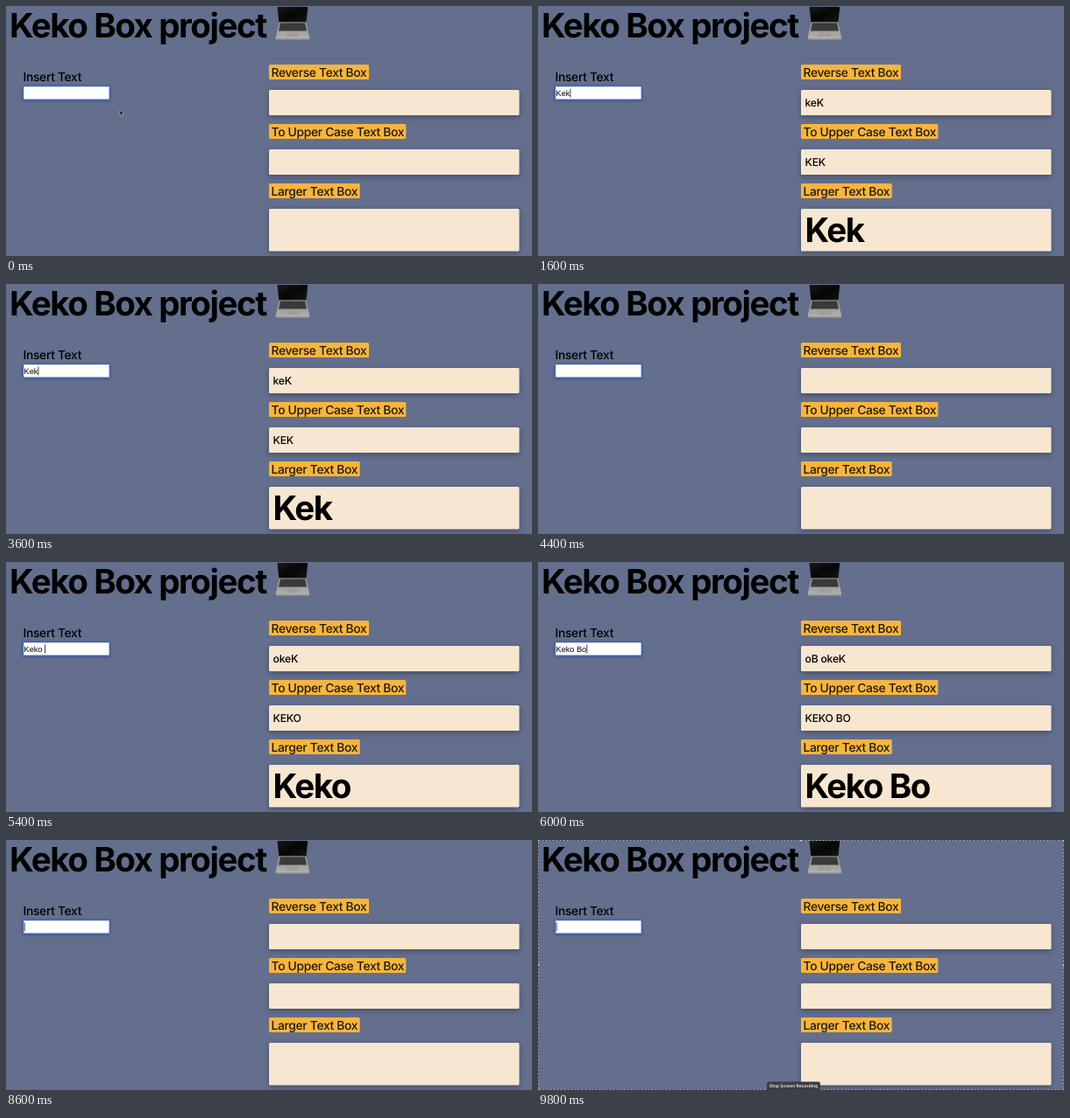
Animation of 600 by 286 pixels, one loop 9900 ms. Source, as an HTML page:

```html
<!DOCTYPE html>
<html lang="en">
<head>
<meta charset="utf-8">
<title>Keko Box project</title>
<style>
  html, body { margin: 0; width: 100%; height: 100%; overflow: hidden; background: #636f8d; }
  svg { display: block; width: 600px; height: 286px; font-family: Inter, sans-serif; text-rendering: geometricPrecision; }
  .big { font-size: 38.5px; font-weight: 700; letter-spacing: -1.43px; }
  .label { font-size: 13.8px; font-weight: 500; letter-spacing: -.3px; }
  .pill + .label { fill: #1c1810; }
  .out { font-size: 12.2px; font-weight: 500; letter-spacing: -.22px; }
  .field { font: 9.2px "Liberation Sans", Arial, sans-serif; }
  .pill { fill: #f8b53d; }
  .box { fill: #f7e6d0; filter: drop-shadow(0 2px 3px rgba(20, 25, 45, .4)); }
  .input { fill: #fff; stroke: #3f65b8; stroke-width: 1.4; filter: drop-shadow(0 1px 1.5px rgba(30, 50, 110, .45)); }
</style>
</head>
<body>
<svg viewBox="0 0 600 286">
  <defs>
    <linearGradient id="glass" x2="1" y2="1">
      <stop offset="0" stop-color="#1a1a1b"/>
      <stop offset=".5" stop-color="#060606"/>
      <stop offset="1" stop-color="#151516"/>
    </linearGradient>
    <linearGradient id="metal" x2="0" y2="1">
      <stop offset="0" stop-color="#8f8d8b"/>
      <stop offset="1" stop-color="#b5b2b0"/>
    </linearGradient>
  </defs>

  <text class="big" x="4" y="36.2">Keko Box project</text>
  <g id="laptop">
    <path d="M309.500 2Q309.500 1 310.500 1H343Q344.200 1 344.200 2L342.500 18.500H311.500Z" fill="url(#glass)"/>
    <path d="M311.500 18.500H342.500L346.200 36.500Q346.500 38.500 345 38.500H309Q307.300 38.500 307.600 36.500Z" fill="url(#metal)"/>
    <path d="M313 19.500H341L343 28.500H311Z" fill="#3b3a3a"/>
    <path d="M320.500 30H333.500L334.200 35H319.800Z" fill="#a09e9c"/>
    <path d="M308 38H346" stroke="#77757a" stroke-width=".8"/>
  </g>

  <text class="label" x="19.500" y="86">Insert Text</text>
  <rect class="input" x="19.500" y="91.500" width="98.800" height="15.800" rx="1"/>
  <text class="field" id="field" x="20.500" y="102.700"></text>
  <rect id="caret" y="94.500" width=".8" height="10" fill="#111"/>

  <g id="panels"></g>

  <path id="mouse" d="M130 119V125.200L131.400 124L132.400 126.200L133.400 125.700L132.500 123.600H134.300Z"
        fill="#0b0b0d" stroke="#d5d8e0" stroke-width=".5"/>

  <g id="recorder">
    <rect x=".5" y=".5" width="599" height="285" fill="none" stroke="#3b4254"/>
    <rect x=".5" y=".5" width="599" height="285" fill="none" stroke="#a3aabb" stroke-dasharray="2 2"/>
    <g id="handles" fill="#c9cdd6" stroke="#555c6e" stroke-width=".5"></g>
    <rect x="261" y="276.500" width="61" height="12" rx="2.500" fill="#3b3c43"/>
    <text x="291.500" y="282.800" text-anchor="middle" font-size="5" font-weight="600" fill="#f2f2f4">Stop Screen Recording</text>
  </g>
</svg>
<script>
const LOOP = 9900, STEP = 100;
const $ = id => document.getElementById(id);

// label, pill width, top of box, box height, text class, baseline
const panels = [
  ['Reverse Text Box', 114, 96, 29, 'out', 114.5],
  ['To Upper Case Text Box', 156.3, 164, 29, 'out', 182.5],
  ['Larger Text Box', 103.7, 232, 48.500, 'big', 269.5]
];
$('panels').innerHTML = panels.map(([label, w, y, h, cls, base], i) => `
  <rect class="pill" x="300" y="${y - 29}" width="${w}" height="17" rx="1.500"/>
  <text class="label" x="302.500" y="${y - 15}">${label}</text>
  <rect class="box" x="300" y="${y}" width="285.500" height="${h}" rx="1.500"/>
  <text class="${cls}" id="out${i}" x="304.500" y="${base}"></text>`).join('');

$('handles').innerHTML = [0, 300, 600].flatMap(x => [0, 143, 286].map(y => [x, y]))
  .filter(([x, y]) => x !== 300 || y !== 143)
  .map(([x, y]) => `<circle cx="${x}" cy="${y}" r="1.800"/>`).join('');

// Each word is typed and then erased; one time per key press.
const words = [
  { text: 'KekoBox',
    type: [1200, 1400, 1600, 1800, 2100, 2300, 2500],
    erase: [3200, 3400, 3500, 3600, 3700, 3800, 3900] },
  { text: 'Keko Box',
    type: [4700, 4900, 5000, 5200, 5400, 5800, 6000, 6100],
    erase: [7700, 7900, 8000, 8100, 8200, 8300, 8400, 8500] }
];
const keys = words.flatMap(w => [...w.type, ...w.erase]);
const pressed = (times, t) => times.filter(k => k <= t).length;

function typedAt(t) {
  const word = t < 4300 ? words[0] : words[1];
  return word.text.slice(0, pressed(word.type, t) - pressed(word.erase, t));
}

const pen = document.createElement('canvas').getContext('2d');
pen.font = '9.2px "Liberation Sans", Arial, sans-serif';

const show = (id, on) => $(id).setAttribute('visibility', on ? 'visible' : 'hidden');

function draw(t) {
  const text = typedAt(t);
  const outputs = [[...text].reverse().join(''), text.toUpperCase(), text];
  $('field').textContent = text;
  outputs.forEach((s, i) => $('out' + i).textContent = s);

  const lastKey = keys.filter(k => k <= t).pop() ?? -500;
  $('caret').setAttribute('x', 20.7 + pen.measureText(text).width);
  show('caret', (t - lastKey) % 1000 < 500);
  show('mouse', t < keys[0]);
  show('recorder', t >= 8900);
}

const start = performance.now();
let last = -1;
function tick() {
  const t = Math.floor((performance.now() - start) % LOOP / STEP) * STEP;
  if (t !== last) draw(last = t);
  requestAnimationFrame(tick);
}
draw(0);
tick();
</script>
</body>
</html>
```
